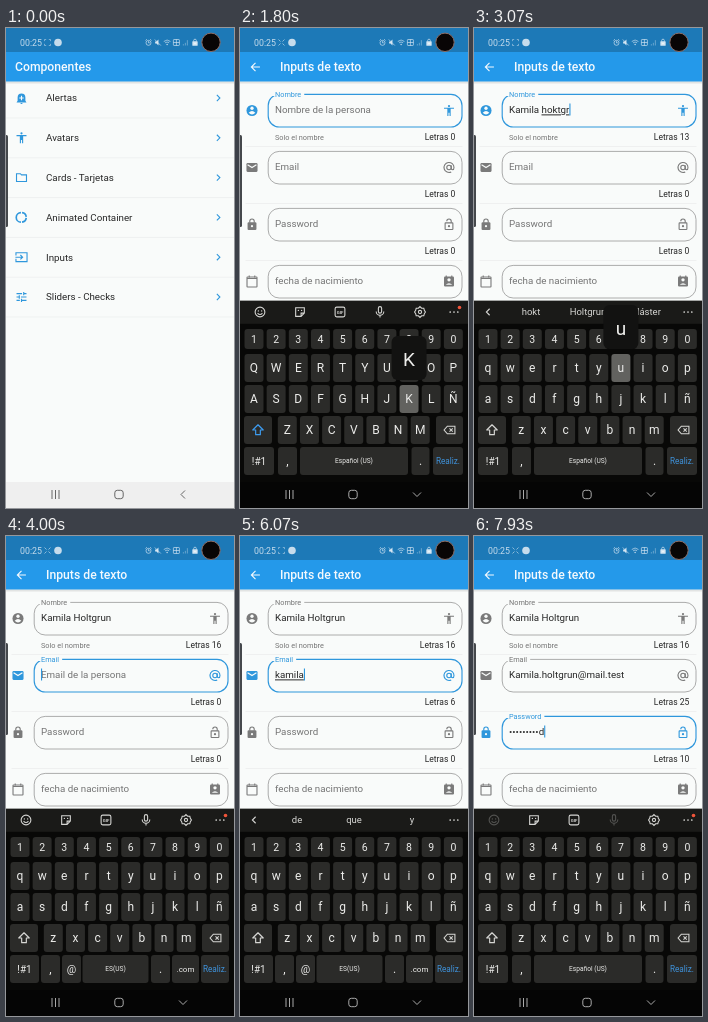
These frames come from a looping animation (228 by 480 pixels, 8000 ms). An HTML page:

```html
<!DOCTYPE html>
<html lang="es">
<head>
<meta charset="utf-8">
<title>Componentes</title>
<style>
  html, body { margin: 0; width: 100%; height: 100%; overflow: hidden; background: #f9fbfa; }
  svg { display: block; width: 100vw; height: 100vh; font-family: Roboto, sans-serif; }
  .line { fill: none; stroke: currentColor; stroke-width: 2; }
  .solid { fill: currentColor; }
  .hole { fill: #f9fbfa; }
  .cut { fill: none; stroke: #f9fbfa; stroke-width: 2; }
  .thin { fill: none; stroke: currentColor; stroke-width: 1; }
  .divider { stroke: #ebedec; stroke-width: .7; }
  .title { font-weight: 500; font-size: 12.2px; fill: #f4f9fd; }
  .text { font-size: 9.78px; fill: #262626; }
  .small { font-size: 8.56px; fill: #262626; }
  .tiny { font-size: 7.34px; fill: #747474; }
  .grey { fill: #747474; }
  .key { fill: #2b2b29; }
  .keys text, .bar text { fill: #ececea; text-anchor: middle; }
  .bar text { fill: #d6d6d3; }
</style>
</head>
<body>
<svg id="stage" viewBox="0 0 228 480"></svg>
<script>
const LOOP = 8000;
const PAPER = '#f9fbfa', BAR = '#2499ea', ACCENT = '#2f97dc', GREY = '#7a7a7a', OUTLINE = '#979797';
const PALE = '#d6d6d3';

const line = (d, extra = '') => `<path class="line" d="${d}" ${extra}/>`;
const solid = d => `<path class="solid" d="${d}"/>`;
const disc = (x, y, r, cls = 'solid') => `<circle class="${cls}" cx="${x}" cy="${y}" r="${r}"/>`;
const rect = (x, y, w, h, rx, attrs) =>
  `<rect x="${x}" y="${y}" width="${w}" height="${h}" rx="${rx}" ${attrs}/>`;
const label = (x, y, text, cls, attrs = '') =>
  `<text x="${x}" y="${y}" class="${cls}" ${attrs}>${text}</text>`;

// Icons live on a 24 x 24 grid.
const icons = {
  bell: solid('M3 20h18l-2-3v-6a7 7 0 0 0-14 0v6zM10 21h4a2 2 0 0 1-4 0zM10 5a2 2 0 0 1 4 0z') +
    '<path class="cut" d="M12 8v8M8 12h8"/>',
  body: disc(12, 4, 2) + solid('M3 7h18v2h-6v13h-2v-6h-2v6H9V9H3z'),
  folder: line('M3 7V5h7l2 2h9v12H3z'),
  donut: line('M11 3.5a8.5 8.5 0 0 0 0 17M13 3.5a8.5 8.5 0 0 1 7.5 7.5M13 20.5a8.5 8.5 0 0 0 7.5-7.5',
    'style="stroke-width:3"'),
  input: line('M2 9V4h20v16H2v-5M1 12h12M10 8l4 4-4 4'),
  tune: line('M3 6h10M16 3v6M16 6h5M3 12h5M8 9v6M11 12h10M3 18h6M12 15v6M12 18h9'),
  next: line('M9 6.5l5.5 5.5L9 17.5'),
  back: line('M20 12H5M12 4.5L4.5 12l7.5 7.5'),
  account: disc(12, 12, 10) + disc(12, 8, 3, 'hole') + '<path class="hole" d="M6 16q6-6 12 0-6 6-12 0z"/>',
  mail: rect(2, 4, 20, 16, 2, 'class="solid"') + '<path class="cut" d="M4 7l8 5 8-5"/>',
  lock: rect(4, 8, 16, 14, 2, 'class="solid"') + line('M8 9V6a4 4 0 0 1 8 0v3') + disc(12, 15, 2, 'hole'),
  unlock: rect(5, 9, 14, 12, 1, 'class="line"') + line('M8 6a4 4 0 0 1 8 0v3') + disc(12, 15, 2),
  at: disc(12, 12, 4, 'line') + line('M16 8v5.5q0 2.5 2.5 2.5T21 12a9 9 0 1 0-5 8'),
  calendar: rect(3, 4, 18, 18, 1, 'class="line"') + line('M3 6.5h18M7 1v4M17 1v4'),
  card: rect(3, 3, 18, 18, 2, 'class="solid"') + line('M7 1v4M17 1v4') + disc(12, 9, 3, 'hole') +
    '<path class="hole" d="M6 18q6-6 12 0z"/>',
  select: rect(4, 4, 16, 16, 0, 'class="line" stroke-dasharray="2.5 1.5"') + rect(8, 8, 8, 8, 0, 'class="line"'),
  person: disc(12, 8, 3, 'line') + line('M5 19v-2q7-5 14 0v2z'),
  drop: solid('M7 10h10l-5 5z'),
  smile: disc(12, 12, 9, 'line') + disc(9, 10, 1.3) + disc(15, 10, 1.3) + line('M7.5 14q4.5 5 9 0'),
  sticker: line('M4 4h16v10l-6 6H4zM14 20v-6h6') + disc(9, 9, 1.3) + disc(15, 9, 1.3),
  gif: rect(3, 3, 18, 18, 3, 'class="line"') +
    '<text x="12" y="15" style="font-size:8px;font-weight:700">GIF</text>',
  mic: rect(9, 2, 6, 12, 3, 'class="line"') + line('M5 11a7 7 0 0 0 14 0M12 18v4'),
  gear: line('M12 2l3 3h4l1 4 2 3-2 3-1 4h-4l-3 3-3-3H5l-1-4-2-3 2-3 1-4h4z') + disc(12, 12, 3, 'line'),
  dots: disc(5, 12, 1.6) + disc(12, 12, 1.6) + disc(19, 12, 1.6),
  prev: line('M15 6l-6 6 6 6'),
  shift: line('M12 3l9 9h-5v8H8v-8H3z', 'stroke-linejoin="round"'),
  erase: line('M8 5h14v14H8l-6-7zM12 9l6 6M18 9l-6 6'),
  alarm: disc(12, 13, 7.5, 'line') + line('M12 8v5h4M3 6l4-4M21 6l-4-4'),
  mute: solid('M4 9h4l6-6v18l-6-6H4z') + line('M3 3l18 18'),
  wifi: line('M2 9q10-9 20 0M6 13q6-5 12 0') + disc(12, 18, 2),
  volte: rect(3, 3, 18, 18, 2, 'class="line"') + line('M3 12h18M12 3v18'),
  signal: line('M5 21v-4M11 21v-8M17 21V5'),
  corners: line('M3 8V3h5M16 3h5v5M21 16v5h-5M8 21H3v-5'),
  cross: line('M3 3l6 6M21 3l-6 6M21 21l-6-6M3 21l6-6'),
};
const icon = (name, x, y, color, size = 13.3, attrs = '') =>
  `<g ${attrs} style="color:${color}"><g transform="translate(${x - size / 2} ${y - size / 2}) scale(${size / 24})">${icons[name]}</g></g>`;

// Menu page
const menu = [['bell', 'Alertas'], ['body', 'Avatars'], ['folder', 'Cards - Tarjetas'],
  ['donut', 'Animated Container'], ['input', 'Inputs'], ['tune', 'Sliders - Checks']];
const menuPage = label(9, 43, 'Componentes', 'title') + menu.map(([name, text], i) => {
  const y = 70 + i * 39.8;
  return icon(name, 15.5, y, ACCENT) + label(40, y + 3.3, text, 'text') + icon('next', 212.5, y, ACCENT) +
    `<path class="divider" d="M0 ${y + 20}h228"/>`;
}).join('');

// Form page
const fields = [
  { top: 66, name: 'Nombre', hint: 'Nombre de la persona', left: 'account', right: 'body' },
  { top: 123, name: 'Email', hint: 'Email de la persona', left: 'mail', right: 'at' },
  { top: 180, name: 'Password', hint: 'Password', left: 'lock', right: 'unlock' },
  { top: 237, name: 'fecha de nacimiento', hint: '', left: 'calendar', right: 'card' },
  { top: 329, name: 'Documento de identidad', hint: '', left: 'person', right: 'person' },
];
const fieldMarkup = ({ top, name, hint, left, right }, i) =>
  icon(left, 12, top + 16.5, GREY, 13.3, `id="left${i}"`) +
  rect(28.2, top + .4, 193.8, 32.6, 11, `id="box${i}" fill="none"`) +
  rect(32, top - 1, 0, 3, 0, `id="notch${i}" fill="${PAPER}"`) +
  icon(right, 209, top + 16.5, GREY, 13.3, `id="right${i}"`) +
  label(35, top + 19.4, hint, 'text grey', `id="hint${i}" opacity="0"`) +
  label(0, 0, name, 'text', `id="label${i}"`) +
  label(35, top + 19.4, '', 'text', `id="value${i}" xml:space="preserve"`) +
  label(215.3, top + 45.8, 'Letras 0', 'small', `id="count${i}" text-anchor="end"`) +
  `<path class="divider" d="M5.5 ${top + 52.5}h217"/>`;
const formPage = icon('back', 15.5, 39, '#f4f9fd') + label(40, 43, 'Inputs de texto', 'title') +
  fields.map(fieldMarkup).join('') +
  label(35, 111.5, 'Solo el nombre', 'tiny') +
  icon('select', 12, 307, '#444') + label(35, 310.3, 'D.N.I', 'text') + icon('drop', 132, 307, '#666') +
  '<path d="M35 316h104" stroke="#d5d5d5" stroke-width=".7"/><path class="divider" d="M5.5 322h217"/>' +
  label(14, 403, 'Nombre:', 'text') + label(14, 414, 'Email:', 'small grey') +
  label(214, 408.3, 'D.N.I', 'small', 'text-anchor="end"') +
  rect(34.5, 74.5, 1.1, 12, 0, `id="caret" fill="${ACCENT}"`);

// Keyboard
const keySpots = {};
const key = (x, y, w, text, size = 12, h = 28, fill = '#ececea') => {
  keySpots[text] = { x, y };
  return rect(x - w / 2, y - h / 2, w, h, 3, `class="key" data-key="${text}"`) +
    label(x, y + size * .35, text, '', `data-cap="${text}" style="font-size:${size}px;fill:${fill}"`);
};
const row = (chars, x, y, size, h) =>
  [...chars].map((c, i) => key(x + i * 22.15, y, 19, c, size, h)).join('');
const bottomRow = keys => keys.map(([x, w, text, size, fill]) => key(x, 433, w, text, size, 28, fill)).join('');
const plainRow = bottomRow([[19, 30, '!#1', 10], [47.5, 19, ',', 12], [114, 108, 'Español (US)', 6.6],
  [180.5, 18, '.', 12], [208, 30, 'Realiz.', 8.2, '#3f93dc']]);
const emailRow = bottomRow([[18.5, 29, '!#1', 10], [44.5, 19, ',', 12], [65.5, 19, '@', 10.5], [109.5, 66, 'ES(US)', 6.6],
  [154.5, 19, '.', 12], [179.5, 27, '.com', 8], [209, 28, 'Realiz.', 8.2, '#3f93dc']]);
const tools = ['smile', 'sticker', 'gif', 'mic', 'gear', 'dots'].map((name, i) =>
  icon(name, [20, 60, 100, 140, 180, 214][i], 284, PALE, 13, `id="${name}"`)).join('') +
  '<circle cx="219.5" cy="279.5" r="1.8" fill="#f0553a"/>';
const keyboard = rect(0, 272.8, 228, 182, 0, 'fill="#080807"') + rect(0, 272.8, 228, 23, 0, 'fill="#1a1a18"') +
  `<g class="bar"><g id="tools">${tools}</g><g id="words">` +
  icon('prev', 14, 284, PALE, 13) + icon('dots', 214, 284, PALE, 13) +
  [57, 114, 172].map((x, i) => label(x, 287.4, '', '', `id="word${i}" style="font-size:9.5px"`)).join('') +
  '</g></g><g class="keys">' +
  row('1234567890', 14, 311, 10.5, 20) + row('qwertyuiop', 14, 340, 12) + row('asdfghjklñ', 14, 371, 12) +
  rect(4, 388, 28, 28, 3, 'class="key"') + icon('shift', 18, 402, PALE, 14, 'id="shift"') +
  row('zxcvbnm', 47.3, 402, 12) + rect(196, 388, 27, 28, 3, 'class="key"') + icon('erase', 209.5, 402, PALE, 13) +
  `<g id="plainRow">${plainRow}</g><g id="emailRow">${emailRow}</g>` +
  '<g id="popup">' + rect(-17.5, -63, 35, 44, 6, 'fill="#121211"') +
  label(0, -33.5, '', '', 'id="popupText" style="font-size:19px"') + '</g></g>';

// Status and navigation bars
const statusIcons = ['alarm', 'mute', 'wifi', 'volte', 'signal', 'lock'].map((name, i) =>
  icon(name, 142.5 + i * 9.3, 14.5, '#d5e6f3', 8, name === 'signal' ? 'opacity=".6"' : 'stroke-width="3"')).join('');
const statusBar = label(14, 18, '00:25', '', 'fill="#c6dcec" style="font-size:8.8px"') +
  icon('corners', 41.5, 14.5, '#a9cbe4', 8, 'id="corners"') + icon('cross', 41.5, 14.5, '#c6dcec', 8, 'id="cross"') +
  '<circle cx="52" cy="14.5" r="3.8" fill="#c6dcec"/>' + statusIcons +
  '<circle cx="205" cy="14.3" r="9.2" fill="#080505" stroke="#8d6d66"/>';
const navIcons = (color, arrow) => `<g style="color:${color}">` +
  `<path class="thin" d="M46 462v9M49.5 462v9M53 462v9${arrow}"/>` +
  rect(108.8, 462.3, 8.4, 8.4, 2.5, 'class="thin"') + '</g>';
const navBar = rect(0, 454, 228, 26, 0, 'fill="#efefef"') + navIcons('#666', 'M179 462.5l-4 4 4 4') +
  '<g id="darkNav">' + rect(0, 454, 228, 26, 0, 'fill="#050505"') + navIcons('#aaa', 'M173 464.5l4 4 4-4') + '</g>';

document.getElementById('stage').innerHTML =
  '<defs><linearGradient id="shade" x2="0" y2="1"><stop stop-opacity=".14"/><stop offset="1" stop-opacity="0"/></linearGradient></defs>' +
  rect(0, 0, 228, 480, 0, `fill="${PAPER}"`) + rect(0, 53.5, 228, 3, 0, 'fill="url(#shade)"') +
  rect(0, 0, 228, 53.5, 0, `fill="${BAR}"`) + rect(0, 0, 228, 24, 0, 'fill="#1d79b7"') +
  `<g id="menuPage">${menuPage}</g><g id="formPage">${formPage}</g>` + statusBar +
  rect(-2, 107, 4, 92, 1.5, 'fill="#45484c"') + `<g id="keyboard">${keyboard}</g>` + navBar;

const $ = Object.fromEntries([...document.querySelectorAll('[id]')].map(el => [el.id, el]));
const keyRects = [...document.querySelectorAll('[data-key]')];
const letterCaps = [...document.querySelectorAll('[data-cap]')].filter(el => /^[a-zñ]$/.test(el.dataset.cap));

// Script of the session: strokes commit at their time, the finger goes down a little earlier.
const HOLD = 90;
const typing = (text, start, step, field) =>
  [...text].map((char, i) => ({ char, at: start + i * step, field }));
const strokes = [
  ...typing('Kamila hoktgrun ', 1870, 98, 0),
  ...typing('kamila', 4420, 123, 1),
  ...typing('solyciudad', 7050, 90, 2),
];
const FILL_AT = 6350;
const focusTimes = [1130, 3800, 6600];
const suggestions = [[0, ''], [1900, 'Ka|Kamila|La'], [2560, 'ho|hola|hoy'], [2900, 'hokt|Holtgrun|Máster'],
  [3345, 'y|de|en'], [3850, ''], [4440, 'la|las|los'], [5270, 'de|que|y'], [6650, '']];

const ramp = (t, start, length) => {
  const p = Math.min(1, Math.max(0, (t - start) / length));
  return 1 - (1 - p) ** 3;
};
const show = (el, on) => { el.style.display = on ? '' : 'none'; };
const setText = (el, text) => { if (el.textContent !== text) el.textContent = text; };

function valueOf(field, t) {
  const done = strokes.filter(s => s.field === field && s.at <= t);
  let text = done.map(s => s.char).join('');
  if (field === 0 && text.length === 16) text = 'Kamila Holtgrun ';
  if (field === 1 && t >= FILL_AT) text = 'Kamila.holtgrun@mail.test';
  if (field === 2 && text) {
    const recent = t - done[done.length - 1].at < 1000;
    text = '•'.repeat(text.length - recent) + (recent ? text.slice(-1) : '');
  }
  return text;
}

function renderField(i, t, focused) {
  const { top } = fields[i];
  const active = i === focused;
  const text = i < 3 ? valueOf(i, t) : '';
  const rise = i < 3 ? ramp(t, focusTimes[i], 200) : 0;
  const scale = 1 - rise * .25;
  $['left' + i].style.color = $['right' + i].style.color = active ? ACCENT : GREY;
  $['box' + i].setAttribute('stroke', active ? ACCENT : OUTLINE);
  $['box' + i].setAttribute('stroke-width', active ? 1.15 : .8);
  $['label' + i].setAttribute('transform', `translate(35 ${top + 19.4 - rise * 16}) scale(${scale})`);
  $['label' + i].style.fill = active ? ACCENT : '#747474';
  const width = $['label' + i].getComputedTextLength() * .75 + 6;
  $['notch' + i].setAttribute('width', rise * width);
  $['hint' + i].setAttribute('opacity', text ? 0 : rise);
  setText($['count' + i], 'Letras ' + text.length);

  const composing = active && i < 2 && !(i === 1 && t >= FILL_AT);
  const split = composing ? text.lastIndexOf(' ') + 1 : text.length;
  const markup = text.slice(0, split) + `<tspan text-decoration="underline">${text.slice(split)}</tspan>`;
  const value = $['value' + i];
  if (value.dataset.markup !== markup) {
    value.dataset.markup = markup;
    value.innerHTML = markup;
  }
  if (active) {
    const changes = strokes.filter(s => s.field === i && s.at <= t).map(s => s.at);
    if (i === 1 && t >= FILL_AT) changes.push(FILL_AT);
    const last = Math.max(focusTimes[i], ...changes);
    show($.caret, (t - last) % 1000 < 500);
    $.caret.setAttribute('x', 35 + (text ? value.getComputedTextLength() : 0));
    $.caret.setAttribute('y', top + 9.5);
  }
}

function renderKeyboard(t, focused) {
  const up = ramp(t, 1220, 230);
  $.keyboard.setAttribute('transform', `translate(0 ${(1 - up) * 182})`);
  show($.keyboard, up > 0);
  $.darkNav.setAttribute('opacity', ramp(t, 1220, 120));

  const upper = t < 1870;
  letterCaps.forEach(el => setText(el, upper ? el.dataset.cap.toUpperCase() : el.dataset.cap));
  $.shift.style.color = upper ? '#3d9cf0' : PALE;
  const email = t >= 3850 && t < 6650;
  show($.emailRow, email);
  show($.plainRow, !email);

  const words = suggestions.filter(([at]) => at <= t).pop()[1];
  show($.tools, !words);
  show($.words, words);
  words.split('|').forEach((word, i) => setText($['word' + i], word));
  $.smile.style.opacity = $.mic.style.opacity = focused === 2 ? .3 : 1;

  const stroke = strokes.filter(s => s.at - HOLD <= t).pop();
  const char = stroke ? stroke.char : ' ';
  const spot = keySpots[char.toLowerCase()];
  const pressed = spot && t < stroke.at;
  keyRects.forEach(el => {
    el.style.fill = pressed && el.dataset.key === char.toLowerCase() ? '#62625f' : '';
  });
  const popped = spot && stroke.field < 2 && t < stroke.at + 40;
  show($.popup, popped);
  if (popped) {
    $.popup.setAttribute('transform', `translate(${spot.x} ${spot.y})`);
    setText($.popupText, char);
  }
}

function render(t) {
  const opened = ramp(t, 350, 250);
  $.menuPage.setAttribute('opacity', 1 - opened);
  $.formPage.setAttribute('opacity', opened);
  const expanded = t % 3000 < 500;
  show($.corners, expanded);
  show($.cross, !expanded);

  const focused = focusTimes.filter(at => at <= t).length - 1;
  show($.caret, false);
  fields.forEach((_, i) => renderField(i, t, focused));
  renderKeyboard(t, focused);
}

const start = performance.now();
function tick() {
  render((performance.now() - start) % LOOP);
  requestAnimationFrame(tick);
}
tick();
</script>
</body>
</html>
```
